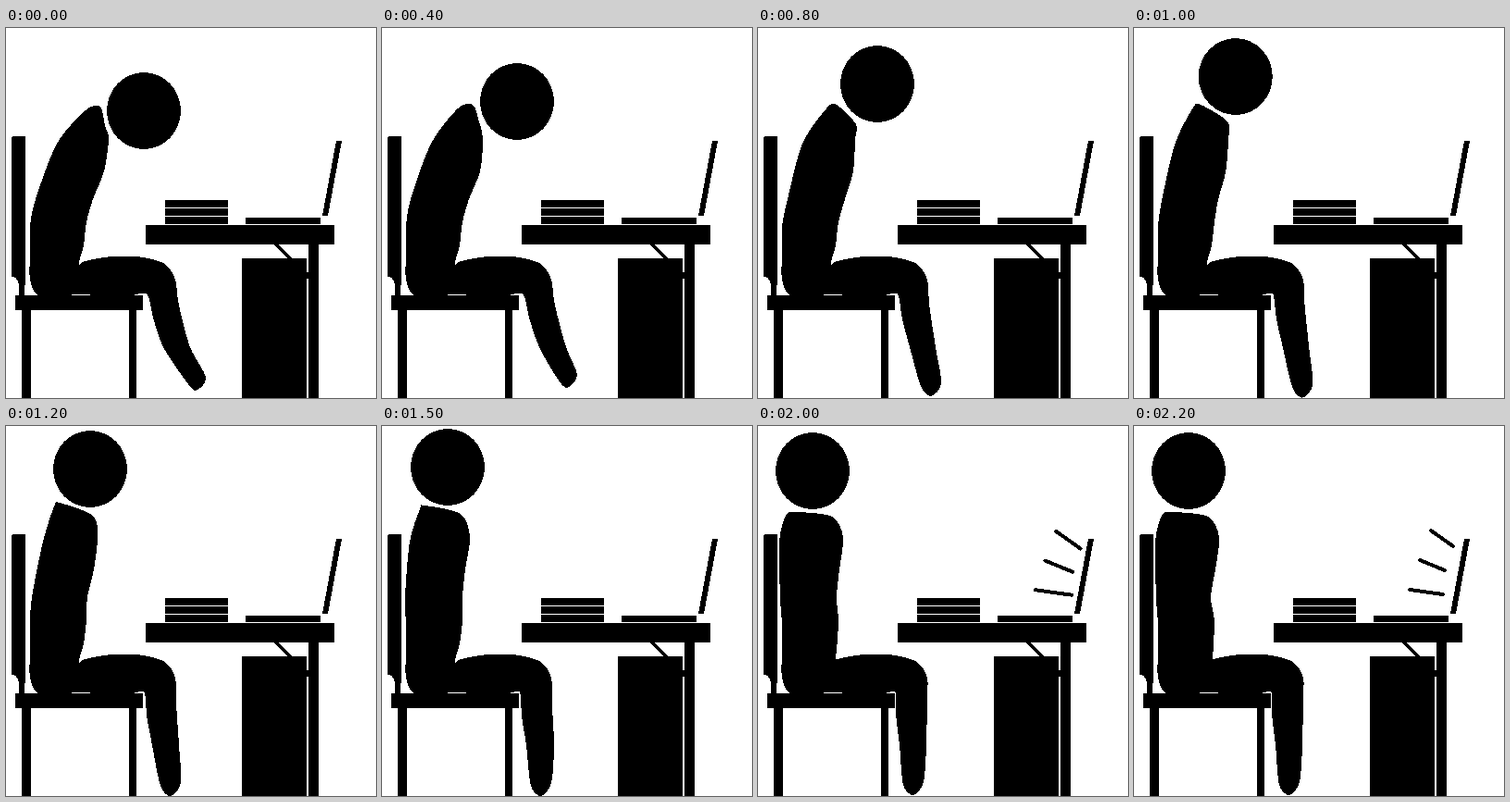
Animation of 400x400 px, one loop 2.3 s. Source, as an HTML page:

```html
<!DOCTYPE html>
<html lang="en">
<head>
<meta charset="utf-8">
<title>Sitting up straight</title>
<style>
  html, body { margin: 0; height: 100%; overflow: hidden; background: #fff; }
  svg { display: block; width: 100vw; height: 100vh; }
</style>
</head>
<body>
<svg viewBox="0 0 400 400" shape-rendering="crispEdges">
  <!-- chair -->
  <rect x="6" y="117" width="15" height="152" rx="2"/>
  <path d="M6 266H21L20 290H14V277Q12 269 6 268Z"/>
  <path d="M10 289H148V305H141V400H133V305H27V400H17V305H10Z"/>
  <!-- desk, strut, cabinet -->
  <rect x="151" y="213" width="204" height="21"/>
  <rect x="327" y="234" width="11" height="166"/>
  <rect x="255" y="249" width="70" height="151"/>
  <path d="M289 234H294L309 249H304ZM325 264h2v7h-2z"/>
  <!-- books, laptop -->
  <path d="M172 186h68v8h-68zm0 9h68v8h-68zm0 9h68v8h-68zM259 205h81v7h-81z"/>
  <path d="M357 122H363L348 203H342Z"/>
  <!-- person -->
  <ellipse id="head" rx="40" ry="41.5"/>
  <path id="torso"/>
  <path id="leg"/>
  <path id="rays" stroke="#000" stroke-width="4" stroke-linecap="round"/>
</svg>
<script>
const $ = id => document.getElementById(id);

// Every key starts with its step number.
const headKeys = [
  [0, 149, 89.5], [3, 146, 79.5], [6, 135, 67.5], [7, 129, 60.5],
  [11, 91, 46.5], [14, 71, 44.5], [16, 64, 48.5], [17, 59, 48.5]
];

// nape x, collar x y, shoulder x y, three front x, two back x
const torsoKeys = [
  [0, 86, 102, 85, 107, 106, 111, 106, 94, 32, 55],
  [3, 82, 98, 83, 104, 98, 109, 106, 94, 31, 53],
  [7, 74, 85, 83, 106, 104, 105, 103, 94, 32, 48],
  [11, 52, 58, 83, 94, 97, 99, 95, 88, 28, 40],
  [14, 41, 46, 86, 85, 95, 95, 90, 87, 25, 30],
  [17, 30, 40, 93, 80, 98, 92, 88, 87, 24, 23]
];

// shin x, toe x y, calf x
const legKeys = [
  [0, 199, 205, 392, 170], [3, 199, 200, 389, 170], [7, 192, 187, 398, 164],
  [11, 187, 178, 400, 158], [14, 186, 172, 400, 156], [16, 182, 168, 399, 153]
];

// Near end and far end of each ray, and the visible span at its three steps.
const rays = [[345, 130, 321, 113], [336, 156, 309, 145], [334, 182, 298, 177]];
const spans = [[-.15, .25], [-.15, .95], [0, 1]];

// Smooth (Hermite) interpolation between keys.
function pose(keys, s) {
  const last = keys.length - 1;
  if (s >= keys[last][0]) return keys[last].slice(1);
  const i = keys.findIndex(k => k[0] > s) - 1;
  const a = keys[i], b = keys[i + 1], d = b[0] - a[0], u = (s - a[0]) / d;
  const slope = (j, c) => {
    const p = keys[Math.max(j - 1, 0)], q = keys[Math.min(j + 1, last)];
    return (q[c] - p[c]) / (q[0] - p[0]);
  };
  return a.map((v, c) =>
    v + (b[c] - v) * u * u * (3 - 2 * u) +
    d * u * (1 - u) * (slope(i, c) * (1 - u) - slope(i + 1, c) * u)
  ).slice(1);
}

// Closed soft curve through the points.
function blob(points) {
  const n = points.length, at = i => points[(i + n) % n];
  const handle = (i, sign) =>
    at(i).map((v, c) => v + sign * (at(i + 1)[c] - at(i - 1)[c]) / 7);
  return "M" + points[0] + points.map((p, i) =>
    "C" + [handle(i, 1), handle(i + 1, -1), at(i + 1)]).join("") + "Z";
}

function torso(s) {
  const [nape, cx, cy, sx, sy, chest, ribs, waist, low, high] = pose(torsoKeys, s);
  const hip = 79 + 1.2 * Math.max(0, s - 14);
  return blob([
    [nape, cy + 4], [cx, cy], [sx, sy], [chest, 120], [ribs, 155],
    [waist - 2 * Math.max(0, s - 17), 185], [87, 210], [84 + (hip - 79) / 3, 235], [hip, 256],
    [85, 278], [70, 289], [36, 290], [26, 272], [26, 245], [26, 215], [low, 185], [high, 125]
  ]);
}

function leg(s) {
  const [shin, x, y, calf] = pose(legKeys, s);
  const bend = calf - 154;
  return blob([
    [60, 285], [78, 257], [90, 251], [115, 247], [140, 247], [158, 250], [173, 256],
    [183, 272], [183 + (shin - 183) / 4, 300], [shin, 345],
    [x + 11, y - 14], [x, y], [x - 11, y - 11],
    [calf, 345], [150 + bend * .6, 315], [149 + bend * .3, 290], [146, 287], [130, 289]
  ]);
}

function stepAt(t) {
  if (t >= 1800) return t < 2000 ? 17 : t < 2200 ? 18 : 19;
  return Math.max(0, Math.floor(t / 100) - 1);
}

function draw(s) {
  const [x, y] = pose(headKeys, s);
  $("head").setAttribute("transform", `translate(${x} ${y})`);
  $("torso").setAttribute("d", torso(s));
  $("leg").setAttribute("d", leg(s));

  const span = spans[s - 17];
  $("rays").setAttribute("d", !span ? "" : rays.map(([x0, y0, x1, y1]) =>
    "M" + span.map(u => [x0 + (x1 - x0) * u, y0 + (y1 - y0) * u]).join("L")).join(""));
}

function frame() {
  draw(stepAt(performance.now() % 2300));
  requestAnimationFrame(frame);
}
frame();
</script>
</body>
</html>
```
